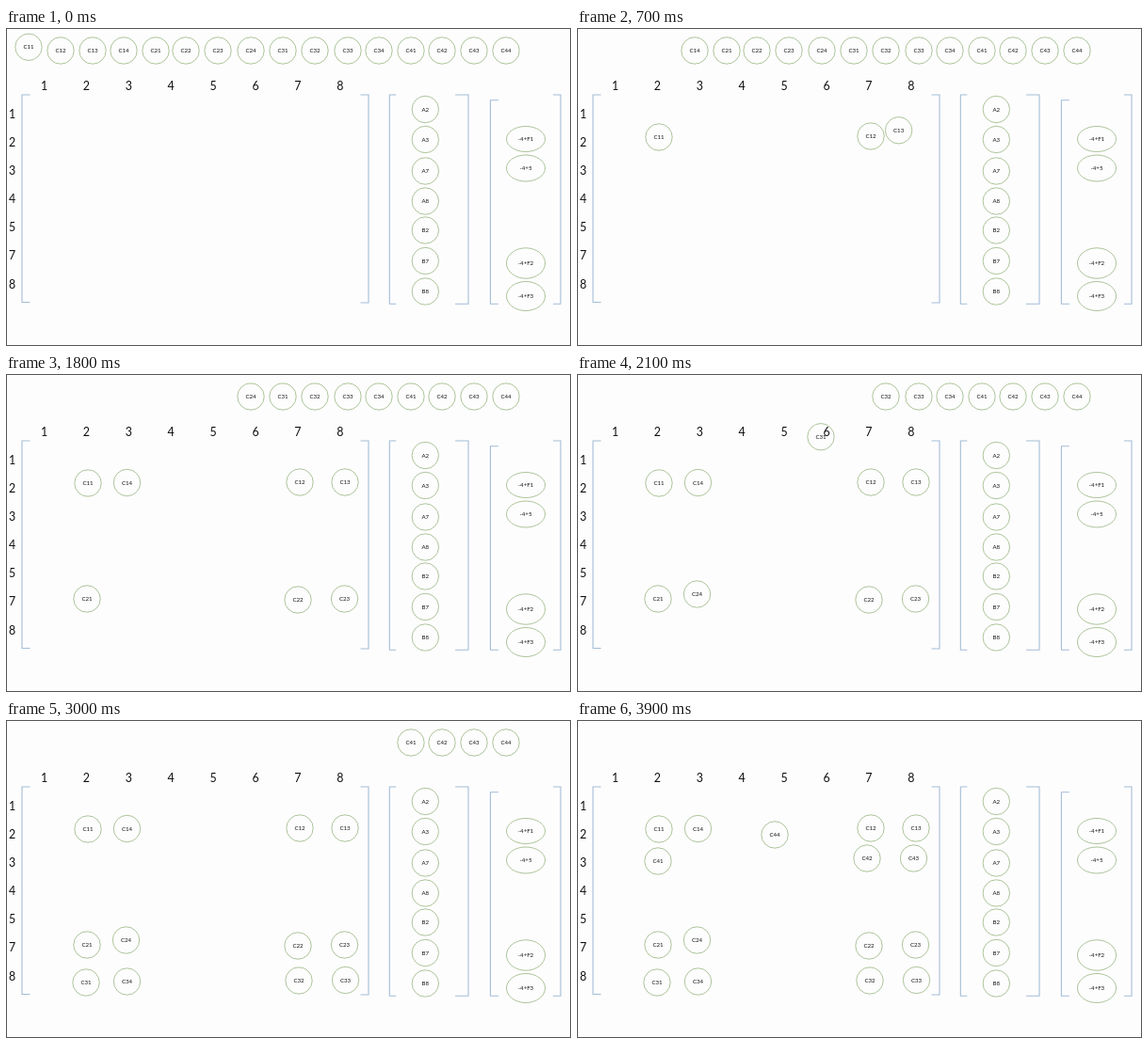
Write an HTML page with a canvas that moves like this. It is 600 by 338 pixels and loops after 4000 ms.

```html
<!DOCTYPE html>
<html lang="en">
<head>
<meta charset="utf-8">
<title>Matrix assembly</title>
<style>
  html, body { margin: 0; width: 100%; height: 100%; overflow: hidden; background: #fefdfe; }
  canvas { display: block; width: 600px; height: 338px; }
</style>
</head>
<body>
<canvas id="stage"></canvas>
<script>
const W = 600, H = 338, LOOP = 4000, STEP = 100;
const canvas = document.getElementById('stage');
const ctx = canvas.getContext('2d');
const ratio = window.devicePixelRatio || 1;
canvas.width = W * ratio;
canvas.height = H * ratio;

const GREEN = '#a3be8e', BLUE = '#a3bdd6', INK = '#111';

// Home x in the top row, then the resting place in the matrix.
const tokens = [
  [24, 87, 116], [58, 312, 115], [92, 360, 115], [125, 128.5, 115.5],
  [159, 86, 239], [191, 310, 240], [225, 359.5, 239], [260, 127.5, 234],
  [294, 85, 279], [328, 311, 277], [363, 360.5, 276.5], [396, 128.5, 278],
  [430, 86, 150], [463, 308, 147], [497, 357.5, 147], [531, 128, 147]
].map(([homeX, x, y], i) => ({
  label: 'C' + (Math.floor(i / 4) + 1) + (i % 4 + 1),
  homeX, homeY: i ? 24 : 20.3, x, y
}));

const unknowns = [['A2', 86.5], ['A3', 118.5], ['A7', 152], ['A8', 184],
                  ['B2', 215], ['B7', 247.5], ['B8', 280]];
const constants = [['-4+F1', 118, 13.5], ['-4+5', 149, 14],
                   ['-4+F2', 250, 16.2], ['-4+F3', 285, 15.5]];

// Time in ms against the number of tokens moved so far.
const pace = [[0, 0], [700, 2.84], [1200, 4.8], [1400, 5.39], [1800, 7],
              [2500, 9.94], [3000, 12], [3900, 15.71], [4000, 16]];

function movesAt(t) {
  const i = pace.findIndex(([end]) => end > t);
  const [t0, n0] = pace[i - 1], [t1, n1] = pace[i];
  return n0 + (n1 - n0) * (t - t0) / (t1 - t0);
}

function ease(p) {
  const c = Math.min(1, Math.max(0, p));
  return c * c * (3 - 2 * c);
}

function text(value, x, y, size) {
  ctx.font = size + 'px Lato, sans-serif';
  ctx.fillStyle = INK;
  ctx.textAlign = 'center';
  ctx.textBaseline = 'alphabetic';
  ctx.fillText(value, x, y + size * 0.36);
}

function bubble(label, x, y, rx = 14.2, ry = rx) {
  ctx.beginPath();
  ctx.ellipse(x, y, rx, ry, 0, 0, Math.PI * 2);
  ctx.strokeStyle = GREEN;
  ctx.lineWidth = 0.9;
  ctx.stroke();
  text(label, x, y, 6.1);
}

function bracket(x, top, bottom, lip) {
  ctx.beginPath();
  ctx.moveTo(x + lip, top);
  ctx.lineTo(x, top);
  ctx.lineTo(x, bottom);
  ctx.lineTo(x + lip, bottom);
  ctx.strokeStyle = BLUE;
  ctx.lineWidth = 1.1;
  ctx.stroke();
}

function drawBoard() {
  ctx.fillStyle = '#fefdfe';
  ctx.fillRect(0, 0, W, H);
  ctx.strokeStyle = '#555';
  ctx.lineWidth = 1;
  ctx.strokeRect(0.5, 0.5, W - 1, H - 1);

  for (let i = 0; i < 8; i++) text(i + 1, 40.5 + 44.9 * i, 61.5, 12.4);
  [1, 2, 3, 4, 5, 7, 8].forEach((n, i) => text(n, 6.5, 91.5 + 30.1 * i, 12.4));

  bracket(17, 71, 291.5, 8.5);
  bracket(385, 71, 292, -8.5);
  bracket(407.3, 71, 293.3, 7);
  bracket(491, 71, 293.3, -14);
  bracket(514.4, 76.8, 293.3, 8.5);
  bracket(589, 71, 293.3, -8);

  unknowns.forEach(([label, y]) => bubble(label, 445.3, y));
  constants.forEach(([label, y, ry]) => bubble(label, 552, y, 20.5, ry));
}

function draw(t) {
  ctx.setTransform(ratio, 0, 0, ratio, 0, 0);
  drawBoard();
  const moved = movesAt(t);
  tokens.forEach((token, i) => {
    const p = ease(moved - i);
    bubble(token.label,
      token.homeX + (token.x - token.homeX) * p,
      token.homeY + (token.y - token.homeY) * p);
  });
}

const start = performance.now();
function tick() {
  const t = (performance.now() - start) % LOOP;
  draw(Math.floor(t / STEP) * STEP);
  requestAnimationFrame(tick);
}
tick();
</script>
</body>
</html>
```
